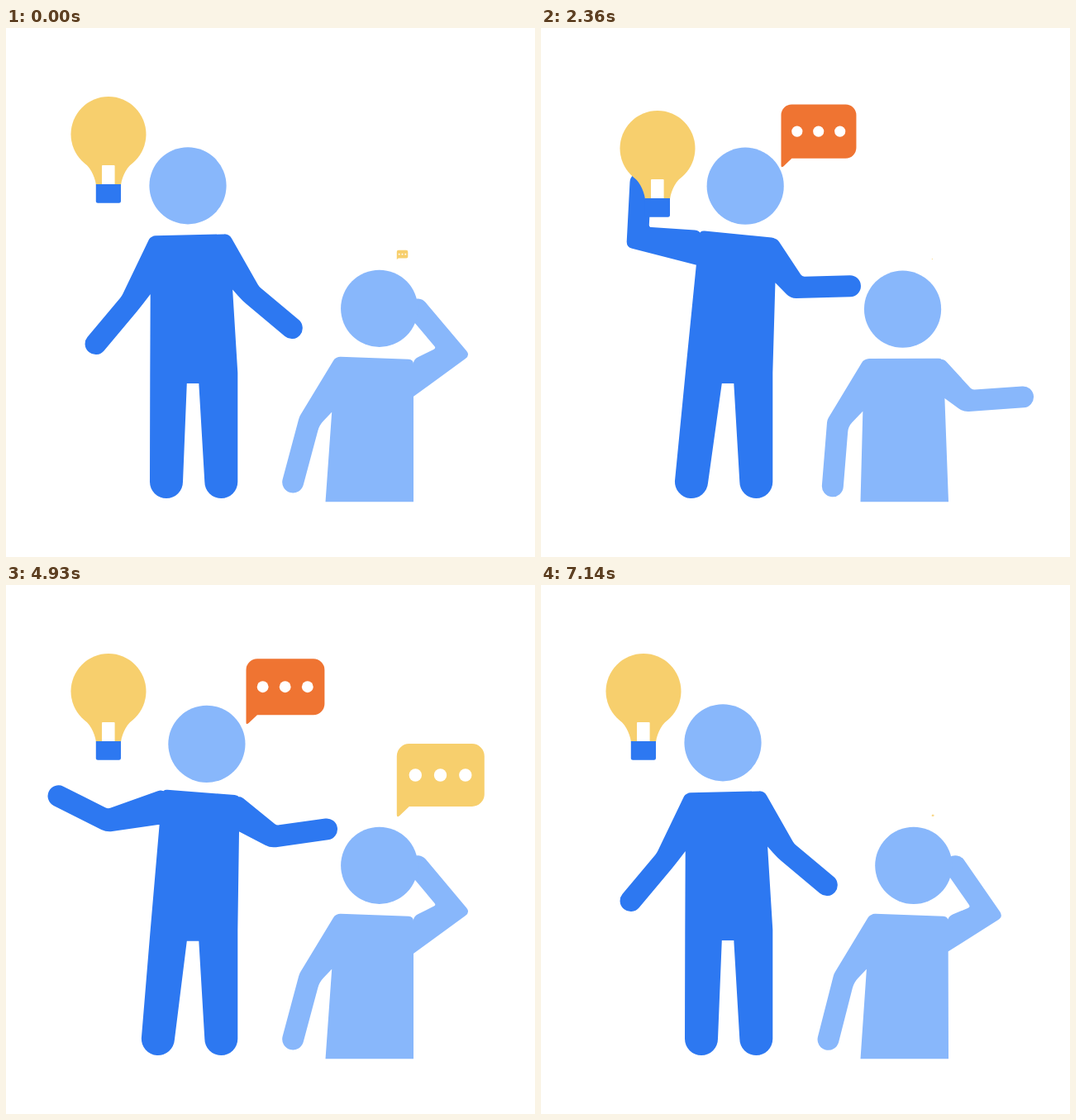
These frames come from a looping animation (640 px wide and 640 px high, 7210 ms). An HTML page:

```html
<!DOCTYPE html>
<html lang="en">
<head>
<meta charset="utf-8">
<title>Sharing an idea</title>
<style>
  html, body { margin: 0; width: 100%; height: 100%; overflow: hidden; background: #fff; }
  svg { display: block; width: 100%; height: 100%; }
</style>
</head>
<body>
<svg viewBox="0 0 640 640">
  <defs>
    <g id="bubble">
      <path d="M0-73a15 15 0 0 1 15-15H91a15 15 0 0 1 15 15V-27a15 15 0 0 1-15 15H15L3.5-1Q0 2 0-2Z"/>
      <g fill="#fff">
        <circle cx="22.5" cy="-50" r="7.7"/>
        <circle cx="52.7" cy="-50" r="7.7"/>
        <circle cx="83" cy="-50" r="7.7"/>
      </g>
    </g>
  </defs>
  <path id="manBody" fill="#2d78f1"/>
  <circle id="manHead" r="46.6" fill="#88b7fb"/>
  <g fill="#88b7fb">
    <path id="palBody"/>
    <circle id="palHead" r="46.6"/>
  </g>
  <use id="orange" href="#bubble" fill="#ef7432"/>
  <use id="yellow" href="#bubble" fill="#f7cf6d"/>
  <g id="bulb">
    <circle cx="124" cy="128.6" r="45.5" fill="#f7cf6d"/>
    <path fill="#f7cf6d" d="M93 161C101 168 107 177 109 190H139C141 177 147 168 155 161Z"/>
    <rect x="116" y="166" width="15.6" height="24" rx="1" fill="#fff"/>
    <path fill="#2d78f1" d="M108.800 189H139V209.500q0 2.300-2.300 2.300H111.100q-2.300 0-2.300-2.300Z"/>
  </g>
</svg>
<script>
const CYCLE = 3605;
const LIMB = 13;   // half the thickness of a forearm
const el = id => document.getElementById(id);
const mix = (a, b, k) => a + (b - a) * k;
const wrap = (u, from) => from + ((u - from) % CYCLE + CYCLE) % CYCLE;
const ease = x => {
  x = Math.min(1, Math.max(0, x));
  return x * x * (3 - 2 * x);
};

// Moves are [start, end, pose]; a pose is held until the next move.
const track = (...moves) => time => {
  const u = wrap(time, moves[0][0]);
  return moves.reduce((pose, [start, end, next]) =>
    pose.map((v, i) => mix(v, next[i], ease((u - start) / (end - start)))), moves.at(-1)[2]);
};

// A bubble overshoots when it appears and swells before it goes.
const pop = (show, grow, hide) => track(
  [show, show + grow, [1.095]], [show + grow, show + grow + 180, [1]],
  [hide, hide + 170, [1.095]], [hide + 170, hide + 650, [0]]);

// Points are [x, y, corner size, arc radius].
function outline(pts) {
  const n = pts.length;
  const toward = ([x, y], [p, q], r) => {
    const k = Math.min(0.45, r / (Math.hypot(p - x, q - y) || 1));
    return `${mix(x, p, k)} ${mix(y, q, k)}`;
  };
  return pts.map((p, i) => {
    const [x, y, r, arc] = p, cmd = i ? 'L' : 'M';
    if (arc) return `A${arc} ${arc} 0 0 1 ${x} ${y}`;
    if (!r) return `${cmd}${x} ${y}`;
    return `${cmd}${toward(p, pts[(i + n - 1) % n], r)}Q${x} ${y} ${toward(p, pts[(i + 1) % n], r)}`;
  }).join('') + 'Z';
}

// Arm with a mitred elbow; the pose is the elbow's offset from the shoulder and the forearm's angle.
// side is -1 for the left arm and 1 for the right one.
function arm(side, [sx, sy], [ox, oy, degrees], length) {
  const reach = Math.hypot(ox, oy);
  const upper = Math.atan2(oy, ox) - side * Math.asin(LIMB / reach);
  const fore = degrees * Math.PI / 180;
  const along = (x, y, angle, d) => [x + Math.cos(angle) * d, y + Math.sin(angle) * d];
  const quarter = side * Math.PI / 2;
  const ex = sx + ox, ey = sy + oy;
  const bisector = (upper + fore) / 2 - quarter;
  const miter = LIMB / Math.cos((fore - upper) / 2);
  const top = along(ex, ey, bisector, miter), bottom = along(ex, ey, bisector, -miter);
  const hand = along(ex, ey, fore, length);
  const near = along(...hand, fore - quarter, LIMB), far = along(...hand, fore + quarter, LIMB);
  const root = along(sx, sy, upper + quarter, 27 + 0.2 * reach);
  const inside = along(...root, Math.atan2(root[1] - bottom[1], root[0] - bottom[0]), 24);
  const pts = [[sx, sy, 6], [...top, 3], near, far, [...bottom, 7], inside];
  if (side < 0) {
    pts.reverse();
    pts[3] = [...near, 0, LIMB];
  } else {
    pts[3] = [...far, 0, LIMB];
  }
  return outline(pts);
}

// Both sides share one direction of drawing, so overlaps stay filled.
function figure(name, head, left, right, lower, armL, armR) {
  el(name + 'Head').setAttribute('transform', `translate(${head})`);
  el(name + 'Body').setAttribute('d',
    outline([[...left, 6], [...right, 6], ...lower]) + armL + armR);
}

function popup(id, x, y, size) {
  el(id).setAttribute('transform', `translate(${x} ${y}) scale(${size})`);
  el(id).setAttribute('visibility', size > 0.005 ? 'visible' : 'hidden');
}

const lean = track([0, 720, [0.78]], [1130, 1690, [1]], [2430, 3210, [0]]);
const leftArm = track([0, 720, [-64, 47, 185]], [1130, 1690, [-74, 14, 262]],
  [1900, 2300, [-75, 8, 273]], [2445, 2850, [-41, 63, 160]], [2850, 3400, [-24, 80, 130]]);
const rightArm = track([0, 640, [41, 50, -8]], [1325, 1690, [24, 60, -1.5]], [2420, 3270, [26, 72, 40]]);
const talk = track([1930, 2535, [1]], [3010, 3620, [0]]);
const shift = track([1900, 2300, [17]], [2440, 2800, [0]]);
const yellow = pop(-120, 570, 1740);
const orange = pop(811, 420, 2638);

function drawMan(u) {
  const [k] = lean(u), dip = 2.5 * Math.sin(Math.PI * k);
  const left = [175 + 17 * k, 251.5 - 6.5 * k + dip];
  const right = [270 + 15 * k, 249.3 + 4.7 * k + dip];
  const foot = 194 - 12 * k, tilt = 1.5 * k, crotch = 430 + 0.7 * dip;
  const legs = [
    [280.3, 417], [280.3, 549], [240.3, 549, 0, 20], [233.3, crotch], [218.8, crotch],
    [foot + 20, 549 + tilt], [foot - 20, 549 - tilt, 0, 20], [174.3, 422]
  ];
  figure('man', [220 + 27.2 * k, 190.8 + 0.4 * k + dip], left, right, legs,
    arm(-1, left, leftArm(u), 66), arm(1, right, rightArm(u), 65));
}

function drawPal(u) {
  const [k] = talk(u);
  const scratch = 5 * (1 - k) * Math.cos(2 * Math.PI * 5.5 * (wrap(u, -590) - 66) / CYCLE);
  const left = [399 - 10 * k, 397.5 + 3.2 * k];
  const right = [493 - 8 * k, 401 - 1.7 * k];
  figure('pal', [451.7 - 17.7 * k, 339.3 + 1.1 * k], left, right, [[493, 573.3], [386.5, 573.3]],
    arm(-1, left, [-32, 78, 105 - 13 * k], 76.5),
    arm(1, right, [48 - 23 * k, 76.2 * k - 9.5, 164.5 * k - 134.5 + scratch], 67));
}

function draw(u) {
  drawMan(u);
  drawPal(u);
  popup('yellow', 472.8, 280, yellow(u)[0]);
  popup('orange', 290.5, 168, orange(u)[0] * 0.858);
  const [s] = shift(u);
  el('bulb').setAttribute('transform', `translate(${s} ${s})`);
}

const start = performance.now();
function tick() {
  draw((performance.now() - start) % CYCLE);
  requestAnimationFrame(tick);
}
tick();
</script>
</body>
</html>
```
